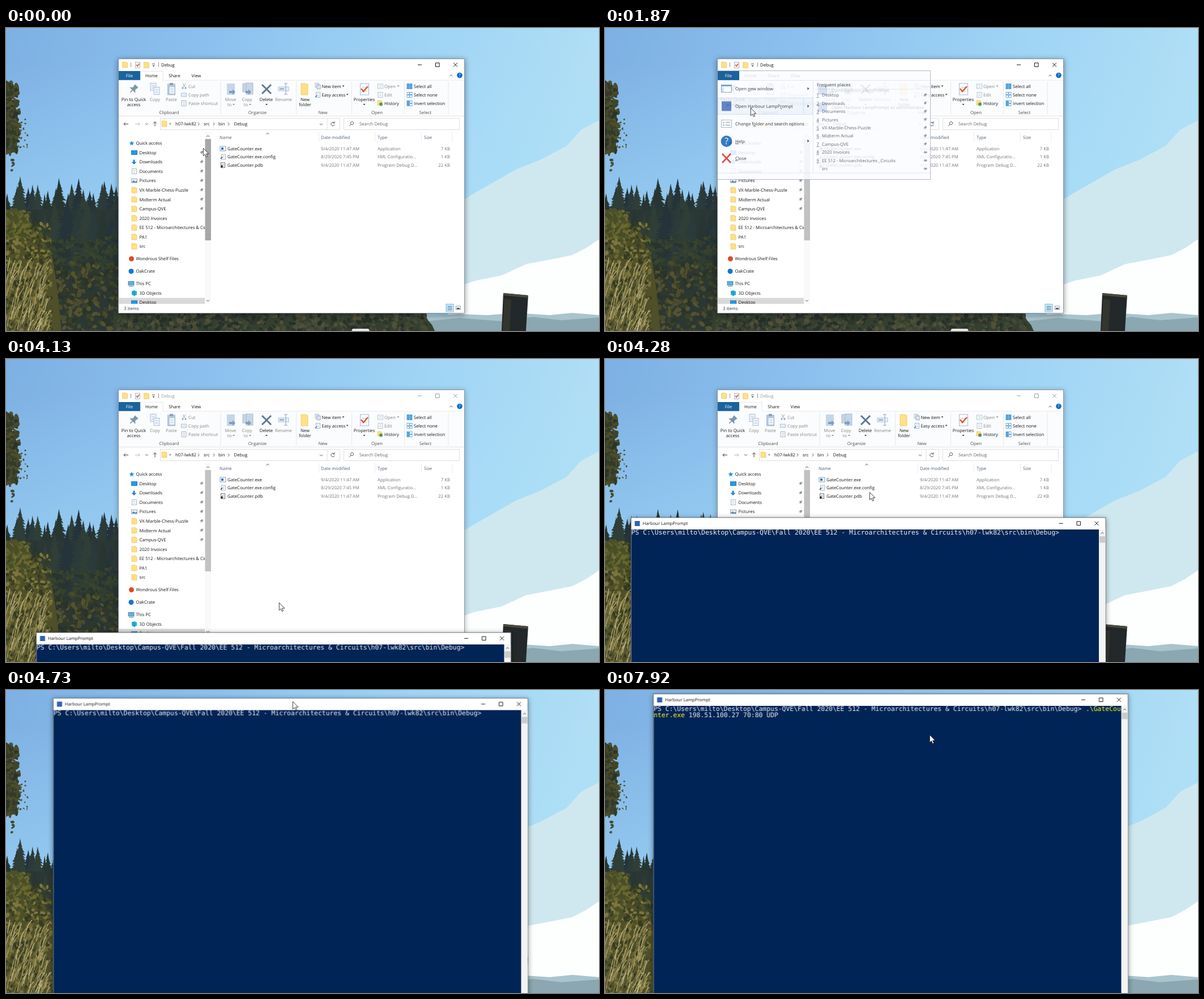
Animation of 1047x535 px, one loop 8000 ms. Source, as an HTML page with a canvas:

```html
<!DOCTYPE html>
<html lang="en">
<head>
<meta charset="utf-8">
<title>Desktop session</title>
<style>
html, body { margin: 0; width: 100%; height: 100%; overflow: hidden; background: #93c9f3; }
canvas, svg { position: absolute; left: 0; top: 0; width: 1047px; height: 535px; }
text { font: 7.75px "Open Sans", "Noto Sans", sans-serif; text-rendering: geometricPrecision; }
.mono text { font: 11.417px "DejaVu Sans Mono", monospace; white-space: pre; }
.strong text { font-weight: 600; }
.key { text-decoration: underline; }
#cursor, #console, #caret, #menu, #submenu, #hover, #title, #shade, #thumb,
#command, #single, #range { animation: 8s step-end infinite; }

#cursor { animation-name: point; }
@keyframes point {
  0% { translate: 348px 212px; }
  1.5% { translate: 322px 170px; }
  3.2% { translate: 262px 105px; }
  4.9% { translate: 181px 58px; }
  6.6% { translate: 196px 70px; }
  8.25% { translate: 212px 82px; }
  15.5% { translate: 222px 95px; }
  17.1% { translate: 240px 118px; }
  18.7% { translate: 254px 134px; }
  20.3% { translate: 257px 141px; }
  28.625% { translate: 262px 165px; }
  30.3% { translate: 275px 215px; }
  32% { translate: 290px 270px; }
  33.6% { translate: 305px 330px; }
  35.3% { translate: 318px 385px; }
  37% { translate: 328px 430px; }
  38.625% { translate: 334px 455px; }
  51.625% { translate: 482px 430px; }
  53.5% { translate: 467px 235px; }
  55.375% { translate: 464.5px 96px; }
  57.25% { translate: 483px 48px; }
  59.125% { translate: 506px 20px; }
  61% { translate: 510px 14px; }
  62.5% { translate: 545px 42px; }
  64.125% { translate: 578px 70px; }
  66%, 100% { translate: 573px 79px; }
}
#console { animation-name: drag; }
@keyframes drag {
  0% { opacity: 0; translate: 53.5px 483px; }
  51.625% { opacity: 1; translate: 53.5px 483px; }
  53.5% { opacity: 1; translate: 46px 280px; }
  55.375% { opacity: 1; translate: 43.5px 89px; }
  57.25% { opacity: 1; translate: 61px 42px; }
  59.125% { opacity: 1; translate: 83.5px 14.5px; }
  61%, 100% { opacity: 1; translate: 85.5px 7px; }
}
#caret { animation-name: blink; }
@keyframes blink {
  0% { opacity: 0; translate: 763px 0; }
  55.375% { opacity: 1; translate: 763px 0; }
  59.125% { opacity: 0; translate: 763px 0; }
  62.5% { opacity: 1; translate: 763px 0; }
  66% { opacity: 0; translate: 763px 0; }
  69.75% { opacity: 1; translate: 763px 0; }
  73.375% { opacity: 0; translate: 763px 0; }
  77.125% { opacity: 1; translate: 151.2px 11px; }
  78.875% { opacity: 1; translate: 171.9px 11px; }
  80.625% { opacity: 0; translate: 171.9px 11px; }
  84.375% { opacity: 1; translate: 171.9px 11px; }
  87.875% { opacity: 1; translate: 220px 11px; }
  91.625% { opacity: 0; translate: 220px 11px; }
  95.25% { opacity: 1; translate: 220px 11px; }
  99%, 100% { opacity: 0; translate: 220px 11px; }
}
#command { animation-name: command; }
@keyframes command { 0% { opacity: 0; } 77.125%, 100% { opacity: 1; } }
#single { animation-name: single; }
@keyframes single { 0% { opacity: 0; } 78.875% { opacity: 1; } 87.875%, 100% { opacity: 0; } }
#range { animation-name: range; }
@keyframes range { 0% { opacity: 0; } 87.875%, 100% { opacity: 1; } }
#menu { animation-name: menu; }
@keyframes menu {
  0% { opacity: 0; }
  11.75% { opacity: 1; }
  23.375% { opacity: .87; }
  25.25% { opacity: .45; }
  26.75%, 100% { opacity: 0; }
}
#submenu { animation-name: submenu; }
@keyframes submenu { 0% { opacity: 0; } 20.3% { opacity: 1; } 23.375% { opacity: .22; } 25.25%, 100% { opacity: 0; } }
#hover { animation-name: hover; }
@keyframes hover { 0% { opacity: 0; } 18.7%, 100% { opacity: 1; } }
#title { animation-name: dim; }
@keyframes dim { 0% { color: #111; } 26.75%, 100% { color: #989898; } }
#shade { animation-name: shade; }
@keyframes shade { 0% { opacity: .36; } 26.75%, 100% { opacity: .25; } }
#thumb { animation-name: thumb; }
@keyframes thumb { 0% { fill: #a7a7a7; } 3.2% { fill: #b3b3b3; } 8.25%, 100% { fill: #c2c2c2; } }
</style>
</head>
<body>
<canvas id="scene" width="1047" height="535"></canvas>
<svg id="stage" viewBox="0 0 1047 535"></svg>
<script>
// ---------- landscape ----------
const g = document.getElementById('scene').getContext('2d');
let seed = 11;
const rnd = (a = 0, b = 1) => a + (b - a) * ((seed = seed * 16807 % 2147483647) / 2147483647);
const pick = list => list[Math.floor(rnd(0, list.length))];

function poly(color, ...pts) {
  g.fillStyle = color;
  g.beginPath();
  for (let i = 0; i < pts.length; i += 2) g.lineTo(pts[i], pts[i + 1]);
  g.fill();
}
// A stack of ragged boughs that widen towards the ground.
function conifer(x, top, color) {
  for (let y = top, w = 2; y < 400; y += 5, w = Math.min(w + 1.7, 20))
    poly(color, x, y - 4, x + w * rnd(.7, 1.2), y + 6, x - w * rnd(.7, 1.2), y + 6);
}
function leaves(n, x0, x1, y0, y1, r, colors) {
  while (n--) {
    g.fillStyle = pick(colors);
    g.beginPath();
    g.ellipse(rnd(x0, x1), rnd(y0, y1), rnd(r * .5, r), rnd(r * .3, r * .7), rnd(0, 3), 0, 7);
    g.fill();
  }
}
function wash(x0, y0, x1, y1, ...colors) {
  const fill = g.createLinearGradient(x0, y0, x1, y1);
  colors.forEach((c, i) => fill.addColorStop(i / (colors.length - 1), c));
  g.fillStyle = fill;
  g.fillRect(0, 0, 1047, 535);
}
function landscape() {
  wash(0, 0, 1000, 260, '#7eb0e3', '#8bc0ee', '#9ed3f5', '#b0dff5');
  wash(0, 60, 0, 300, '#a8e0fa00', '#a8e0fa66');
  poly('#cfe8ef', 780, 320, 830, 290, 900, 250, 945, 232, 990, 208, 1015, 180, 1047, 163, 1047, 535, 780, 535);
  poly('#fdfefe', 780, 462, 830, 446, 875, 437, 918, 417, 960, 409, 1000, 401, 1025, 388, 1047, 373, 1047, 535, 780, 535);
  poly('#a9c4cd', 740, 508, 800, 505, 850, 507, 900, 503, 960, 507, 1000, 503, 1047, 507, 1047, 535, 740, 535);
  poly('#8ba7b1', 740, 518, 800, 512, 880, 518, 930, 510, 980, 516, 1047, 511, 1047, 535, 740, 535);

  const pine = ['#25333a', '#2b3a3b', '#303e38', '#283632'];
  for (let x = -4; x < 215; x += 10) conifer(x + rnd(-4, 4), rnd(262, 298), pick(pine));
  poly('#2b3734', 0, 320, 210, 320, 210, 535, 0, 535);
  for (let x = 0; x < 215; x += 14) conifer(x + rnd(-5, 5), rnd(300, 335), pick(pine));
  leaves(260, 60, 205, 370, 430, 6, ['#27342f', '#303d33', '#35412c', '#3b432d']);
  leaves(420, 60, 205, 415, 540, 6, ['#39412b', '#4a4b2d', '#2a3329', '#55522e', '#31382a']);
  poly('#4f4f29', 0, 322, 18, 318, 40, 338, 62, 368, 82, 405, 90, 455, 98, 535, 0, 535);
  leaves(520, -4, 80, 345, 540, 5, ['#6b6831', '#3d4224', '#4b5027', '#7d7640', '#333a23']);
  leaves(90, 0, 42, 322, 370, 5, ['#6b6831', '#5a5f2b', '#474d27']);
  g.lineWidth = 1.1;
  for (let i = 0; i < 170; i++) {
    const x = rnd(-5, 72), y = rnd(405, 530);
    g.strokeStyle = pick(['#a99a65', '#c6b987', '#857a47', '#6e6a3d']);
    g.beginPath();
    g.moveTo(x, y + 24);
    g.quadraticCurveTo(x + 3, y + 8, x + rnd(4, 14), y);
    g.stroke();
  }
  poly('#3b3f28', 0, 92, 8, 98, 10, 125, 20, 148, 23, 185, 19, 208, 8, 220, 0, 224);
  leaves(170, -8, 22, 100, 222, 6, ['#3f4528', '#4d4c2d', '#323a29', '#2c3326']);
  leaves(40, 14, 38, 160, 212, 2.5, ['#4d512f', '#59573a']);
  leaves(30, -4, 14, 84, 262, 4, ['#4d512f', '#434a31']);

  poly('#343f30', 190, 500, 718, 500, 738, 508, 752, 524, 757, 535, 190, 535);
  leaves(520, 195, 742, 503, 538, 6, ['#2c362b', '#3c4531', '#474a36', '#262f29', '#515039']);
  poly('#e5e9e7', 612, 531, 640, 531, 642, 535, 610, 535);
  poly('#23282a', 878, 468, 922, 472, 918, 535, 875, 535);
  poly('#4a4a3d', 878, 468, 922, 472, 921, 476, 878, 472);
  poly('#33352e', 880, 478, 892, 480, 889, 535, 877, 535);
}
landscape();

// ---------- drawing helpers ----------
const INK = '#161616', GREY = '#858585', BLUE = '#1a75c7';
const course = 'EE 512 - Microarchitectures';
const text = (x, y, s, c = INK, a = 'start') =>
  `<text x="${x}" y="${y + 2.8}" fill="${c}" text-anchor="${a}">${s}</text>`;
const mid = (x, y, s, c) => text(x, y, s, c, 'middle');
const rect = (x, y, w, h, fill, line = 'none', more = '') =>
  `<rect x="${x}" y="${y}" width="${w}" height="${h}" fill="${fill}" stroke="${line}" stroke-width=".8" ${more}/>`;
const disc = (x, y, r, c) => `<circle cx="${x}" cy="${y}" r="${r}" fill="${c}"/>`;
const path = (d, line, w = 1, fill = 'none') =>
  `<path d="${d}" fill="${fill}" stroke="${line}" stroke-width="${w}"/>`;
const at = (x, y, s, turn = 0, k = 1) =>
  `<g transform="translate(${x} ${y}) rotate(${turn}) scale(${k})">${s}</g>`;
const chevron = (x, y, turn = 0, c = '#555') => at(x, y, path('M-2.5-1.2 0 1.2 2.5-1.2', c), turn);
const drop = (x, y, c = '#333') => path(`M${x - 2} ${y - 1}h4l-2 2.2z`, 'none', 0, c);
const arrow = (x, y, turn, c) => at(x, y, path('M4 0H-4M-1-3-4 0-1 3', c), turn);
const folder = (x, y, w = 9, h = 10) =>
  path(`M${x - w / 2} ${y - h / 2}h${w * .75}l1 1.5h${w * .25 - 1}v${h - 1.5}h${-w}z`, '#e6bd55', .6, '#ffe084');
const page = (x, y, w = 7, h = 9, c = '#8fa5bd', fill = '#fff') =>
  rect(x - w / 2, y - h / 2, w, h, fill, c) +
  path(`M${x - w / 4} ${y - h / 6}h${w / 2}m${-w / 2} ${h / 3}h${w / 2}`, c, .7);
const pin = (x, y, turn = 45, k = 1, c = '#7f8f9b') =>
  at(x, y, path('M-1.6-3.6h3.2L1-.8l1.6 1.6h-5.2L-1-.8zM0 .8V4', c, .8, c), turn, k);
const caption = (x, y, c) =>
  path(`M${x - 3.5} ${y}h7M${x + 28} ${y - 3.3}h6.6v6.6h-6.6zM${x + 59.5} ${y - 3.5}l7 7m0-7l-7 7`, c);
const shade = (w, h, id = '') =>
  rect(-1, 1, w + 2, h + 2, '#000', 'none', `${id} opacity=".36" style="filter:blur(5px)"`);

// ---------- file window ----------
function titleBar() {
  return rect(198.5, 54.5, 611, 449, '#fff', '#77899a') + folder(210, 65) +
    path('M220.5 61v8M269.5 61v8', '#777', .8) +
    page(232.5, 65.5, 8, 10) + path('M230 65l2 2.5 3.5-4.5', '#e0552d', 1.4) +
    folder(248, 65.5) + path('M258 63.5h5', '#333', .8) + drop(260.5, 67) +
    `<g id="title" color="${INK}">${text(274, 65.5, 'Debug', 'currentColor')}${caption(730.5, 65, 'currentColor')}</g>` +
    rect(199, 76, 38, 16, '#19639f') + mid(218, 84, 'File', '#fff') +
    path('M199 92.3H237.4V76.4H277V92.3H809', '#dcdfe2', .8) +
    mid(257, 84, 'Home') + mid(297.5, 84, 'Share') + mid(336, 84, 'View') +
    chevron(786, 84, 180) + disc(801, 83.5, 4.8, '#0a6cc4') + mid(801, 83.5, '?', '#fff');
}
function ribbon() {
  const soft = '#c6d6e8', line = '#9db3cb';
  const sheet = (x, y) => page(x, y, 10, 13, line, '#edf3fa');
  const tiles = (x, y, c) => [0, 1, 2, 3].map(i =>
    rect(x + i % 2 * 5, y - 4.5 + (i >> 1) * 5, 4, 4, c[i % c.length], '#4a98d8')).join('');
  const labels = [[288, 'Clipboard'], [444, 'Organize'], [559.5, 'New'], [655, 'Open'], [740.5, 'Select']];
  return rect(199, 92.7, 610, 62.5, '#fbfcfd') + path('M199 155.5H809', '#dadcde', .8) +
    [379, 512.5, 610.5, 703.5, 781].map(x => path(`M${x} 95v58`, '#e0e2e4', .8)).join('') +
    labels.map(l => mid(l[0], 149, l[1], '#4c4c4c')).join('') +
    pin(225, 108, 45, 2, '#7b98ab') + mid(225.5, 126.5, 'Pin to Quick') + mid(225.5, 135.2, 'access') +
    sheet(260, 104) + sheet(266, 111) + mid(263, 126.5, 'Copy', GREY) +
    rect(285.5, 99, 13, 19, '#b9cbe0', line) + rect(289, 97, 6, 4, '#8aa0b8') + sheet(293, 110) + mid(292, 126.5, 'Paste', GREY) +
    path('M312 98l5 7M317 98l-5 7', '#8fa3b8') + disc(312, 106, 1.6, '#8fa3b8') + disc(317, 106, 1.6, '#8fa3b8') +
    text(322, 103, 'Cut', GREY) +
    rect(309.5, 115, 9, 6, '#e6eef7', line) + text(322, 118, 'Copy path', GREY) +
    page(314, 133, 8, 9, '#8b9db5') + text(322, 133, 'Paste shortcut', GREY) +
    rect(390, 98, 14, 20, soft) + path('M394 111h6v-3l5 5-5 5v-3h-6z', 'none', 0, '#7f9dbf') +
    mid(396.5, 126.5, 'Move', GREY) + mid(394.5, 135.2, 'to', GREY) + drop(402, 135, GREY) +
    rect(418, 98, 10, 15, soft, line) + rect(424, 97, 12, 20, soft, line) + path('M423 111h5v-3l5 5-5 5v-3h-5z', 'none', 0, '#7f9dbf') +
    mid(425.5, 126.5, 'Copy', GREY) + mid(423.5, 135.2, 'to', GREY) + drop(431, 135, GREY) +
    path('M452 100l16 16M468 100l-16 16', '#5e7896', 3) + mid(459.5, 126.5, 'Delete') + drop(460, 135) +
    rect(481, 104, 18, 7, '#e8f0f9', line) + rect(483, 106, 8, 3, '#9db8d6') + path('M494 98v19M491 98h6M491 117h6', '#8ba4bf') +
    mid(490, 126.5, 'Rename', GREY) +
    folder(527, 108, 12, 20) + mid(528, 126.5, 'New') + mid(528, 135.2, 'folder') +
    page(549, 101, 6, 7) + page(552, 104, 6, 7, '#6c8aac') + text(557.5, 103, 'New item') + drop(595.5, 102.5) +
    page(551, 118, 7, 9) + path('M546 122l3-3', BLUE, 1.5) + text(557.5, 118, 'Easy access') + drop(602.5, 117.5) +
    page(633, 108, 15, 20) + path('M627 107l4 5 8-9', '#e0552d', 2.5) + mid(632.5, 126.5, 'Properties') + drop(632.5, 135) +
    page(661, 103, 9, 8, line) + text(668, 103, 'Open', GREY) + drop(692.5, 102.5, GREY) +
    page(661, 118, 8, 9, line) + text(668, 118, 'Edit', GREY) +
    folder(660, 132, 8, 8) + disc(662, 134.5, 3, '#4f9a56') + text(668, 133, 'History') +
    tiles(708, 103, ['#4fa6e4']) + text(720, 103, 'Select all') +
    tiles(708, 118, ['#fff']) + text(720, 118, 'Select none') +
    tiles(708, 133, ['#4fa6e4', '#fff']) + text(720, 133, 'Invert selection');
}
function addressBar() {
  const crumbs = [[299, 'h07-lwk82'], [349, 'src'], [375, 'bin'], [402.5, 'Debug']];
  return arrow(212, 169.5, 0, '#444') + arrow(232, 169.5, 180, '#bbb') + chevron(248.5, 169.5) + arrow(263, 169.5, 90, '#444') +
    rect(272.5, 159.5, 317, 20, '#fff', '#d6d6d6') + path('M567 160v19', '#d6d6d6', .8) +
    folder(279.5, 169) + text(288, 168, '«', '#444') +
    crumbs.map(c => text(c[0], 169.5, c[1])).join('') +
    [340, 367, 393].map(x => chevron(x, 169.5, -90)).join('') + chevron(556.5, 170) +
    path('M579.5 167.5a3.2 3.2 0 1 0 .6 3M580 165v3h-3', '#555') +
    rect(596.5, 159.5, 204, 20, '#fff', '#d6d6d6') +
    `<circle cx="611" cy="168" r="2.6" fill="none" stroke="#666"/>` + path('M609 170l-3 3.3', '#666') +
    text(624, 169.5, 'Search Debug', '#666');
}
function fileList() {
  const files = [
    ['GateCounter.exe', '9/4/2020 11:47 AM', 'Application', '7 KB'],
    ['GateCounter.exe.config', '8/29/2020 7:45 PM', 'XML Configuratio...', '1 KB'],
    ['GateCounter.pdb', '9/4/2020 11:47 AM', 'Program Debug D...', '22 KB']];
  const head = [[377, 'Name'], [556, 'Date modified'], [656, 'Type'], [738, 'Size']];
  const icon = y => [
    rect(378, y - 4, 10, 8, '#fff', '#71808f') + rect(380, y - 2, 4, 4, BLUE),
    page(384, y, 7, 9) + path(`M379 ${y + 3}l3-3`, '#444', 1.5),
    page(383, y, 7, 9, '#555') + disc(381, y + 2, 2, '#333')];
  return chevron(462, 186.5, 180) + head.map(h => text(h[0], 193.5, h[1], '#4c607a')).join('') +
    [552.5, 651.5, 733.5, 788].map(x => path(`M${x} 184v17`, '#e6e6e6', .8)).join('') +
    files.map((f, i) => {
      const y = 213 + i * 14.6;
      return icon(y)[i] + text(391, y, f[0]) + text(556, y, f[1], '#737373') +
        text(656, y, f[2], '#737373') + text(784, y, f[3], '#737373', 'end');
    }).join('');
}
function sideBar() {
  const rows = ['Desktop', 'Downloads', 'Documents', 'Pictures', 'VX-Marble-Chess-Puzzle', 'Midterm Actual',
    'Campus-QVE', '2020 Invoices', course + ' &amp; Circuits', 'PA1', 'src'];
  const screen = y => rect(221.5, y - 3.5, 10, 7, '#1e9bec', '#0b6bb5');
  const icons = [screen,
    y => path(`M226 ${y - 4}v5`, '#2781d4', 3) + path(`M221.5 ${y}h9l-4.5 4.5z`, 'none', 0, '#2781d4'),
    y => page(226.5, y, 8, 9),
    y => rect(221.5, y - 3.5, 10, 7, '#e5eff6', '#8699a8') + path(`M222 ${y + 2.5}l3-3 3 2 3-1v2.5z`, 'none', 0, '#3b7da9')];
  return `<clipPath id="pane"><path d="M199 183h152v304h-152z"/></clipPath><g clip-path="url(#pane)">` +
    at(222, 203.5, path('M0-4.5 1.3-1.4 4.5-1.2 2 .9 2.8 4 0 2.3-2.8 4-2 .9-4.5-1.2-1.3-1.4z', 'none', 0, '#2d8fdd')) +
    text(229.5, 203.5, 'Quick access') +
    rows.map((r, i) => {
      const y = 220 + i * 16.55;
      return (icons[i] ? icons[i](y) : folder(226.5, y)) + text(235.5, y, r) + (i < 7 ? pin(345, y, 45, .85) : '');
    }).join('') +
    disc(221.5, 407.5, 4.5, '#df4a22') + text(229.5, 407.5, 'Wondrous Shelf Files') +
    disc(221, 429.5, 4.5, '#0f78d0') + text(229.5, 429.5, 'OakCrate') +
    rect(216, 447.5, 10, 6.5, '#55b5ea', '#57738c') + path('M217 456h8', '#57738c') + text(229.5, 451.5, 'This PC') +
    path('M226.5 463l4.5 2v6l-4.5 2-4.5-2v-6z', 'none', 0, '#25b0dc') + path('M222 465l4.5 2v6', '#0b7ea8', .8) + text(235.5, 468, '3D Objects') +
    rect(199, 476.5, 152, 11, '#d9d9d9') + screen(485) + text(235.5, 484.5, 'Desktop') + '</g>' +
    rect(351, 184, 11, 303, '#f9f9f9') + chevron(356.5, 191, 180) + chevron(356.5, 481.5) +
    rect(351.5, 196, 10.5, 179, '#c2c2c2', 'none', 'id="thumb"') +
    text(208, 495, '3 items', '#333') +
    rect(777, 487.5, 13, 13.5, '#cce8fb', '#55aee8') + path('M779.5 491.5h8M779.5 494.5h8M779.5 497.5h8', '#456', .9) +
    rect(794.5, 491, 8, 6, '#fff', '#789') + rect(796, 494, 5, 2.5, '#456');
}

// ---------- file menu ----------
function fileMenu() {
  const key = c => `<tspan class="key">${c}</tspan>`;
  const items = [[107, `Open ${key('n')}ew window`], [138, 'Open Harbour LampP' + key('r') + 'ompt'],
    [169, 'Change f' + key('o') + 'lder and search options'], [200, key('H') + 'elp'], [230, key('C') + 'lose']];
  const places = ['Desktop', 'Downloads', 'Documents', 'Pictures', 'VX-Marble-Chess-Puzzle', 'Midterm Actual',
    'Campus-QVE', '2020 Invoices', course + ' _Circuits', 'src'];
  const lamp = (x, y, s) => rect(x - s / 2, y - s / 2, s, s, '#4a74bd');
  const more = y => path(`M357.5 ${y - 2.5}v5l3-2.5z`, 'none', 0, '#333');
  return `<g id="menu" opacity="0">` + rect(198.7, 75.5, 376, 192, '#fbfcff', '#929cab') +
    rect(199, 76, 38, 16, '#19639f') + mid(218, 84, 'File', '#fff') +
    `<g id="hover">${rect(199.5, 123.5, 167.5, 29, '#ecf3fc', '#b9d6f2')}${path('M350.5 124v28', '#b9d6f2', .8)}</g>` +
    path('M199 92.5H574M367.5 92.5V256M199 256H574M372 108H571', '#d9dee5', .8) +
    rect(205.5, 100.5, 18, 13, '#fff', '#5b7fa6') + rect(205.5, 100.5, 18, 2.5, '#4f9ad8') + rect(206, 104, 4, 9, '#cbe0f2') +
    lamp(214.5, 138, 17) +
    rect(205.5, 162.5, 18, 13, '#fff', '#8a9bb0') + path('M208 166.5h3M208 171.5h3M213 166.5h8M213 171.5h8', '#5b7fa6') +
    disc(214.5, 200, 10, '#1668b8') + at(214.5, 199, mid(0, 0, '?', '#fff'), 0, 2) +
    path('M207 222l15 16M222 222l-15 16', '#e0312f', 2.6) +
    items.map(i => text(230, i[0], i[1], '#222')).join('') + more(107) + more(138) + more(199.5) +
    `<g class="strong">${text(374, 100, 'Frequent places', '#222')}</g>` +
    places.map((p, i) => {
      const y = 118.5 + i * 14.43;
      return (i < 9 ? text(373.5, y, key(i + 1), '#222') : '') + text(383, y, p, '#222') + pin(565, y, i < 7 ? 45 : 90, .85, '#5c6a75');
    }).join('') +
    `<g id="submenu" opacity="0">` + rect(368, 93, 206, 162.5, '#fbfcff') +
    lamp(384, 110, 16) + text(400, 110, 'Open Harbour LampPrompt') +
    lamp(384, 140, 16) + text(400, 140, 'Open Harbour LampPrompt as administrator') + '</g></g>';
}

// ---------- console ----------
function consoleWindow() {
  const pitch = 6.874, white = '#eeedf0', yellow = '#ffff20';
  const prompt = `PS C:\\Users\\milto\\Desktop\\Campus-QVE\\Fall 2020\\${course} &amp; Circuits\\h07-lwk82\\src\\bin\\Debug>`;
  const cell = (col, row, s, c = white, id = '') =>
    `<text ${id} x="${.5 + col * pitch}" y="${30 + row * 11}" fill="${c}">${s}</text>`;
  return `<g id="console" opacity="0">` + shade(838, 560) + rect(0, 0, 838, 560, '#fff', '#4c5663') +
    rect(6.5, 6, 9, 9, '#2f62b4') + text(20.5, 10.5, 'Harbour LampPrompt') + caption(759, 10.3, INK) +
    rect(.5, 21, 825.5, 540, '#012456') + rect(826, 21, 11.5, 540, '#f3f3f3') +
    chevron(832, 27.5, 180) + rect(827, 33, 10, 11.5, '#cbcbcb') +
    '<g class="mono">' + cell(0, 0, prompt) +
    '<g id="command">' + cell(111, 0, '.\\GateCou', yellow) + cell(0, 1, 'nter.exe', yellow) + cell(9, 1, '198.51.100.27') + '</g>' +
    cell(23, 1, '80', white, 'id="single"') + cell(23, 1, '70:80 UDP', white, 'id="range"') + '</g>' +
    rect(.5, 29.3, pitch, 2.5, '#fdf3dc', 'none', 'id="caret"') + '</g>';
}

const pointer = `<g id="cursor">${path('M.3.3V13.8L3.4 11 5.4 15.7 7.6 14.7 5.6 10.1H9.8z', '#111', .8, '#fff')}</g>`;

document.getElementById('stage').innerHTML =
  at(198, 54, shade(612, 450, 'id="shade"')) + titleBar() + ribbon() + addressBar() +
  fileList() + sideBar() + fileMenu() + consoleWindow() + pointer;
</script>
</body>
</html>
```
